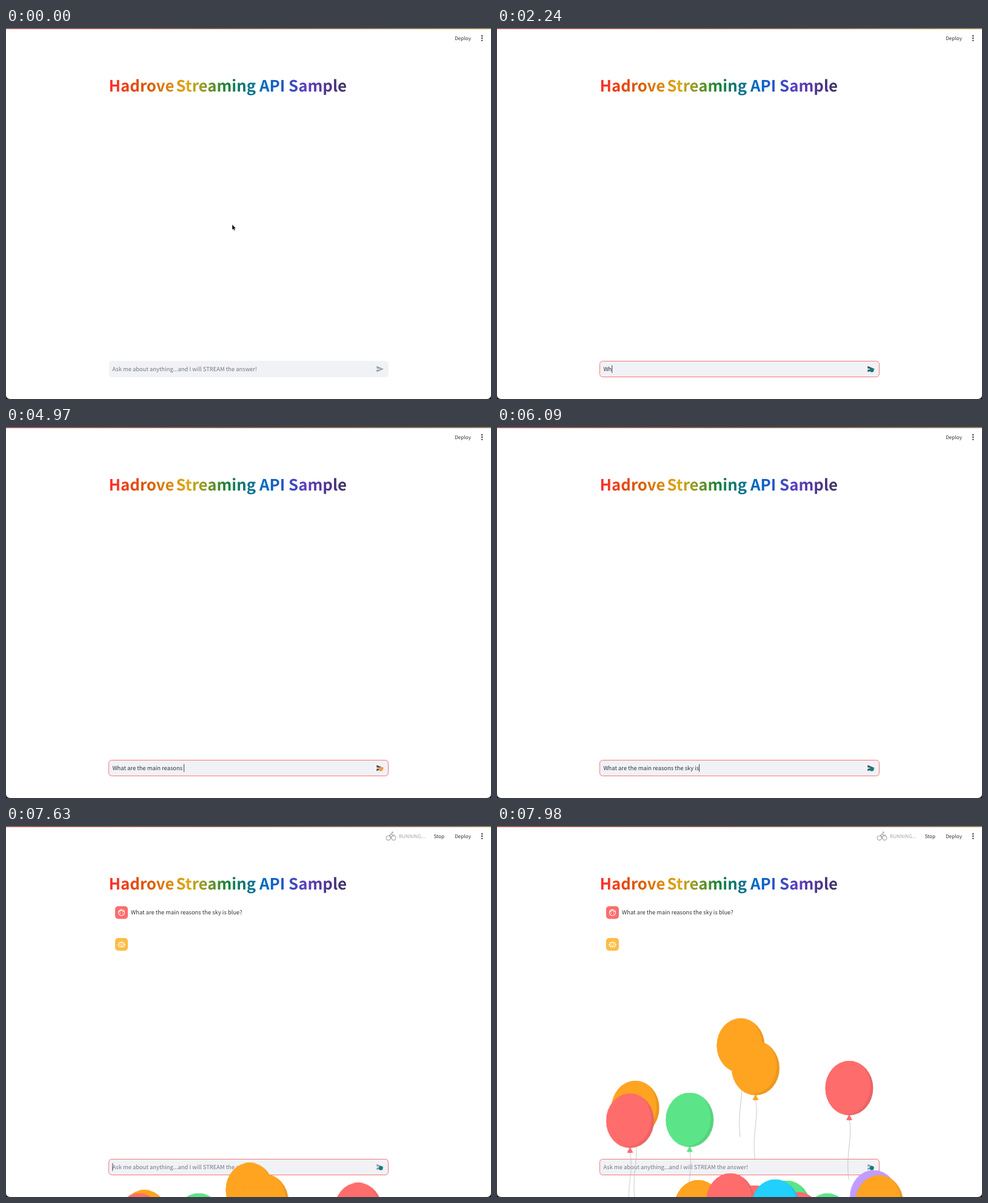
Animation, 800 px wide and 613 px high, one loop 8000 ms. Source, as an HTML page:

```html
<!DOCTYPE html>
<html lang="en">
<head>
<meta charset="utf-8">
<title>Streaming chat</title>
<style>
  html, body { margin: 0; width: 100%; height: 100%; overflow: hidden; background: #fff; }
  svg { display: block; width: 800px; height: 613px; }
  text {
    font: 9.39px "Noto Sans CJK JP", "Noto Sans CJK SC", "Noto Sans CJK KR", "Noto Sans", sans-serif;
    fill: #31333f; white-space: pre; text-rendering: geometricPrecision;
  }
  .title { font-size: 25.8px; font-weight: 700; fill: url(#rainbow); }
  .bar { font-size: 8.2px; }
  .line { fill: none; stroke: #fff; stroke-width: 1.1; stroke-linecap: round; }
  .bike { fill: none; stroke: #a3a4a9; stroke-width: 1.1; stroke-linecap: round; stroke-linejoin: round; }
</style>
</head>
<body>
<svg id="stage" viewBox="0 0 800 613" xmlns="http://www.w3.org/2000/svg">
  <defs>
    <linearGradient id="rainbow" gradientUnits="userSpaceOnUse" x1="170" y1="0" x2="561" y2="0">
      <stop offset="0" stop-color="#ff2b2b"/>
      <stop offset=".167" stop-color="#d95a00"/>
      <stop offset=".333" stop-color="#dea816"/>
      <stop offset=".5" stop-color="#158237"/>
      <stop offset=".667" stop-color="#0068c9"/>
      <stop offset=".833" stop-color="#5f3dbe"/>
      <stop offset="1" stop-color="#3f3163"/>
    </linearGradient>
    <linearGradient id="edge">
      <stop offset="0" stop-color="#954a4a"/>
      <stop offset=".45" stop-color="#7d4f3e"/>
      <stop offset="1" stop-color="#857a48"/>
    </linearGradient>
    <clipPath id="skin"><ellipse cy="45" rx="39.5" ry="45"/></clipPath>
  </defs>

  <rect width="800" height="613" fill="#fff"/>

  <text class="title" x="169.5" y="104.5">Hadrove</text>
  <text class="title" x="280.5" y="104.5">Streaming API Sample</text>

  <text class="bar" x="740.2" y="19.8">Deploy</text>
  <g fill="#31333f">
    <circle cx="785.2" cy="13" r="1.2"/><circle cx="785.2" cy="16.8" r="1.2"/><circle cx="785.2" cy="20.6" r="1.2"/>
  </g>
  <g id="running">
    <g class="bike">
      <circle cx="630.6" cy="19.8" r="3.6"/><circle cx="639.4" cy="19.8" r="3.6"/>
      <path d="M635 20.5V17.6L632.6 15.6L635.6 12.8L637.8 15.2H640.6" stroke-width="1.3"/>
      <circle cx="637.4" cy="10.6" r="1.1" fill="#a3a4a9" stroke-width=".6"/>
    </g>
    <text class="bar" x="648" y="19.8" style="fill:#a3a4a9">RUNNING...</text>
    <text class="bar" x="705.4" y="19.8">Stop</text>
  </g>

  <g id="asked">
    <rect x="180" y="132.5" width="21" height="21" rx="5" fill="#ff6c6c"/>
    <circle class="line" cx="190.5" cy="143" r="5"/>
    <path class="line" d="M185.8 142.2Q188.8 141.4 189.6 138.4Q191.4 141.6 195.2 141.2"/>
    <circle cx="188.6" cy="144" r=".75" fill="#fff"/><circle cx="192.4" cy="144" r=".75" fill="#fff"/>
    <text x="206" y="146.4">What are the main reasons the sky is blue?</text>
  </g>
  <g id="bot">
    <rect x="180" y="185" width="21" height="21" rx="5" fill="#ffbd45"/>
    <rect class="line" x="186.2" y="192.6" width="8.6" height="7" rx="1.2"/>
    <path class="line" d="M190.5 192.4V190.6M185 195.2V196.8M196 195.2V196.8M188.8 197.8H192.2"/>
    <circle cx="188.7" cy="195.3" r=".8" fill="#fff"/><circle cx="192.3" cy="195.3" r=".8" fill="#fff"/>
  </g>

  <rect x="169.8" y="550" width="461" height="27" rx="5.2" fill="#f0f2f6"/>
  <rect id="focus" x="169.5" y="550.5" width="461" height="26" rx="5" fill="none" stroke="#ff4b4b"/>
  <text id="hint" x="175.4" y="566.8" style="fill:#757781">Ask me about anything...and I will STREAM the answer!</text>
  <text id="typed" x="175.4" y="566.8"></text>
  <rect id="caret" y="557" width=".9" height="13" fill="#31333f"/>
  <path id="send" d="M2 21l21-9L2 3v7l15 2-15 2z" transform="translate(610.2 556.8) scale(.56)"/>
  <circle id="badge" cx="618.2" cy="565.2" r="3.5"/>

  <g id="balloons"></g>

  <path id="arrow" d="M0 0V9.2L2 7.4L3.5 10.4L5.1 9.7L3.7 6.7H6.5Z" fill="#000" stroke="#fff" stroke-width=".6"/>
  <path id="beam" d="M-2-5Q0-5 0-3.6Q0-5 2-5M0-3.8V3.8M-2 5Q0 5 0 3.6Q0 5 2 5M-1 1.6H1" fill="none" stroke="#222" stroke-width="1"/>

  <rect width="800" height="1" fill="url(#edge)"/>
  <rect y="1" width="800" height="1" fill="url(#edge)" opacity=".7"/>
  <path d="M0 606Q0 613 7 613H0ZM800 606Q800 613 793 613H800Z" fill="#111"/>
</svg>
<script>
const LOOP = 8000, TICK = 70, SUBMIT = 7350, CLICK = 840;
const QUESTION = "What are the main reasons the sky is blue?";
// When each key is pressed, in ticks
const KEYS = [
  30, 32, 33, 34, 36, 38, 39, 40, 42, 43, 45, 46, 50,
  53, 56, 57, 59, 60, 61, 62, 63, 64, 65, 66, 69, 71,
  75, 76, 77, 78, 79, 80, 82, 84, 85, 87, 88, 89, 91, 92, 94, 97
];

const COLOR = { orange: "#ffa421", red: "#ff6c6c", green: "#5ce488", cyan: "#21d0fc", purple: "#c19cff" };
// Color, centre x, launch time; back to front
const BALLOONS = [
  ["orange", 402, 7405], ["orange", 426.5, 7449], ["red", 581, 7490],
  ["green", 317.8, 7560], ["orange", 228.3, 7533], ["red", 219.5, 7562],
  ["orange", 332, 7826], ["red", 425, 7855], ["red", 385, 7796],
  ["green", 478, 7829], ["red", 497, 7901], ["cyan", 459, 7823],
  ["green", 545, 7912], ["purple", 621.5, 7783], ["orange", 630.5, 7804]
];

const $ = id => document.getElementById(id);
const show = (id, on) => { $(id).style.display = on ? "" : "none"; };
const within = (t, from, to) => t >= from && t < to;

const flights = BALLOONS.map(([name, x, delay]) => {
  const g = document.createElementNS("http://www.w3.org/2000/svg", "g");
  const fill = COLOR[name];
  g.innerHTML = `
    <path d="M0 97C6 128-6 150-1 196" fill="none" stroke="#b9b9b9" stroke-width=".8"/>
    <path d="M0 88L-5 97.5Q0 99 5 97.5Z" fill="${fill}"/>
    <g clip-path="url(#skin)">
      <rect x="-40" width="80" height="90" fill="${fill}"/>
      <rect x="-40" width="80" height="90" fill="#000" opacity=".08"/>
      <ellipse cx="-5" cy="42" rx="40" ry="46" fill="${fill}"/>
    </g>`;
  $("balloons").append(g);
  const flight = g.animate(
    [{ transform: `translate(${x}px, 613px)` }, { transform: `translate(${x}px, -196px)` }],
    { duration: 1055, delay, easing: "ease-in", fill: "both" }
  );
  flight.pause();
  return flight;
});

function drawPointer(t) {
  const p = Math.min(t / 700, 1);
  const k = p * p * (3 - 2 * p);
  const x = 373 - 18 * k, y = 324.5 + 246.5 * k;
  const overInput = y > 550;
  for (const id of ["arrow", "beam"]) $(id).setAttribute("transform", `translate(${x} ${y})`);
  show("arrow", !overInput);
  show("beam", overInput && t < 2100);
}

function drawInput(t) {
  const sent = t >= SUBMIT;
  const count = sent ? 0 : KEYS.filter(k => k * TICK <= t).length;
  const typed = $("typed");
  typed.textContent = QUESTION.slice(0, count);
  show("hint", !count);

  const width = count ? typed.getComputedTextLength() : 0;
  $("caret").setAttribute("x", 175.4 + width);
  show("caret", t >= CLICK && !within(t, 1400, 1890) && t < 7910);

  show("focus", t >= CLICK);
  $("focus").setAttribute("stroke-opacity", Math.min(.75, .5 + (t - CLICK) / 1000));

  $("send").setAttribute("fill", count ? "#4a4c58" : "#9c9faa");
  show("badge", t >= 2100);
  $("badge").setAttribute("fill", within(t, 4970, 5600) ? "#ff9a3c" : "#0f7f7c");
}

function draw(now) {
  const t = Math.floor((now % LOOP) / TICK) * TICK;
  drawPointer(t);
  drawInput(t);
  show("asked", t >= 7420);
  show("bot", t >= 7490);
  show("running", t >= 7420);
  show("balloons", t >= SUBMIT);
  for (const flight of flights) flight.currentTime = t;
}

const start = performance.now();
function loop() {
  draw(performance.now() - start);
  requestAnimationFrame(loop);
}
loop();
</script>
</body>
</html>
```
